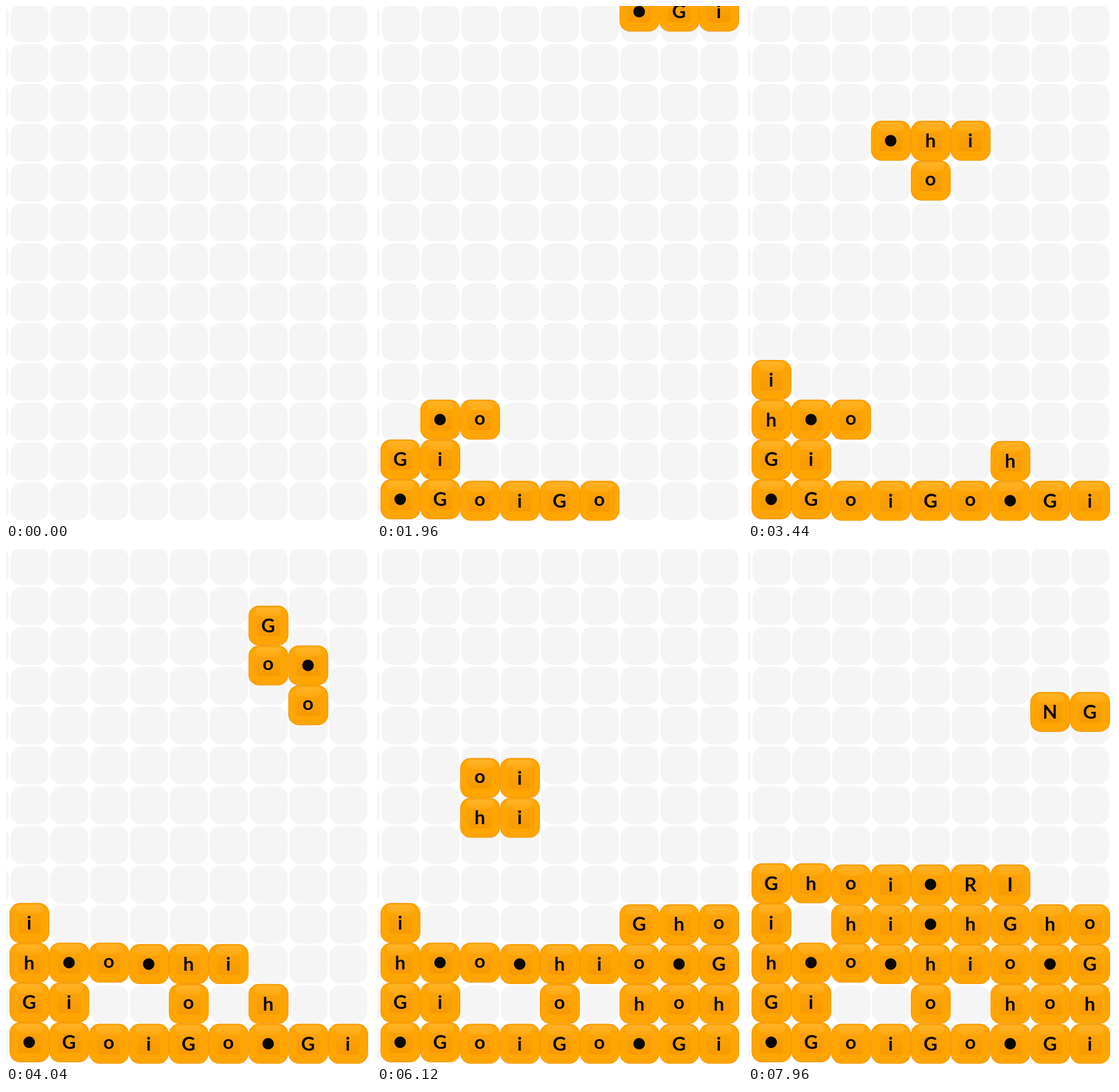
These frames come from a looping animation (630 by 889 pixels, 8000 ms). An HTML page:

```html
<!DOCTYPE html>
<html lang="en">
<head>
<meta charset="utf-8">
<title>Falling letter tiles</title>
<style>
  html, body { margin: 0; width: 100%; height: 100%; overflow: hidden; background: #fff; }
  svg { display: block; width: 100%; height: 100%; }
  text { font: 700 33px Lato, "Open Sans", sans-serif; text-anchor: middle; fill: #0b0805; }
</style>
</head>
<body>
<svg id="stage" viewBox="0 0 630 889">
  <defs>
    <linearGradient id="shine" x2="0" y2="1">
      <stop offset="0" stop-color="#ffb327"/>
      <stop offset="1" stop-color="#ffa90f"/>
    </linearGradient>
    <linearGradient id="well" x2="0" y2="1">
      <stop offset="0" stop-color="#fda306"/>
      <stop offset="1" stop-color="#f79a02"/>
    </linearGradient>
    <g id="tile">
      <rect x=".7" y=".7" width="67.6" height="67.6" rx="17.5" fill="#ffa502" stroke="#f59b0c" stroke-width="1.4"/>
      <rect x="14.5" y="16" width="40" height="37" rx="5" fill="url(#well)"/>
      <path d="M17 3H52Q58 4 58 11Q55 20 34.5 20Q14 20 11 11Q11 4 17 3Z" fill="url(#shine)"/>
    </g>
  </defs>
</svg>
<script>
const LOOP = 8000, STEP = 40, PITCH = 68.75, SIZE = 69;
const stage = document.getElementById('stage');

function add(parent, tag, attrs, text = '') {
  const el = document.createElementNS('http://www.w3.org/2000/svg', tag);
  for (const key in attrs) el.setAttribute(key, attrs[key]);
  el.textContent = text;
  return parent.appendChild(el);
}

for (let row = 0; row < 13; row++)
  for (let col = -1; col < 9; col++)
    add(stage, 'rect', {
      x: 7.8 + PITCH * col, y: -3 + PITCH * row,
      width: 65.8, height: 65.5, rx: 19, fill: '#f5f5f5'
    });

// start ms, fall ms, column, row, top offset, rows of tiles (* is a dot)
const pieces = [
  [0, 500, 0, 11, -8, ['G', '*G']],
  [700, 460, 1, 10, -8, ['*o', 'i']],
  [1300, 500, 2, 12, -5.5, ['oiGo']],
  [1940, 520, 6, 11, -5.5, ['h', '*Gi']],
  [2637, 500, 0, 9, -7.7, ['i', 'h']],
  [3270, 510, 3, 10, -5.5, ['*hi', ' o']],
  [3893, 490, 6, 9, -5.5, ['G', 'o*', ' o']],
  [4520, 490, 7, 9, -5.5, ['ho', ' G', ' h']],
  [5815, 480, 2, 8, -5.5, ['oi', 'hi']],
  [6455, 500, 4, 8, -5.5, ['*RI', '*h']],
  [7140, 500, 0, 8, -7.5, ['Gh']],
  [7760, 469, 7, 8, -5.5, ['NG']]
].map(([start, fall, col, row, top, rows]) => {
  const group = add(stage, 'g', {});
  rows.forEach((line, r) => [...line].forEach((ch, c) => {
    if (ch !== ' ') addTile(group, 6 + PITCH * (col + c), top + PITCH * (row + r), ch);
  }));
  const drop = top + PITCH * (row + rows.length - 1) + SIZE;
  return { group, start, fall, drop };
});

function addTile(group, x, y, ch) {
  const tile = add(group, 'g', { transform: `translate(${x} ${y})` });
  add(tile, 'use', { href: '#tile' });
  if (ch === '*') add(tile, 'circle', { cx: 34, cy: 34.5, r: 10, fill: '#0b0805' });
  else add(tile, 'text', { x: 34, y: ch === 'o' ? 43 : 46 }, ch);
}

const origin = performance.now();

function draw() {
  const t = Math.floor((performance.now() - origin) % LOOP / STEP) * STEP;
  for (const { group, start, fall, drop } of pieces) {
    const left = Math.min(1, Math.max(0, 1 - (t - start) / fall));
    group.setAttribute('visibility', t > start ? 'visible' : 'hidden');
    group.setAttribute('transform', `translate(0 ${-drop * left ** 1.3})`);
  }
  requestAnimationFrame(draw);
}
draw();
</script>
</body>
</html>
```
